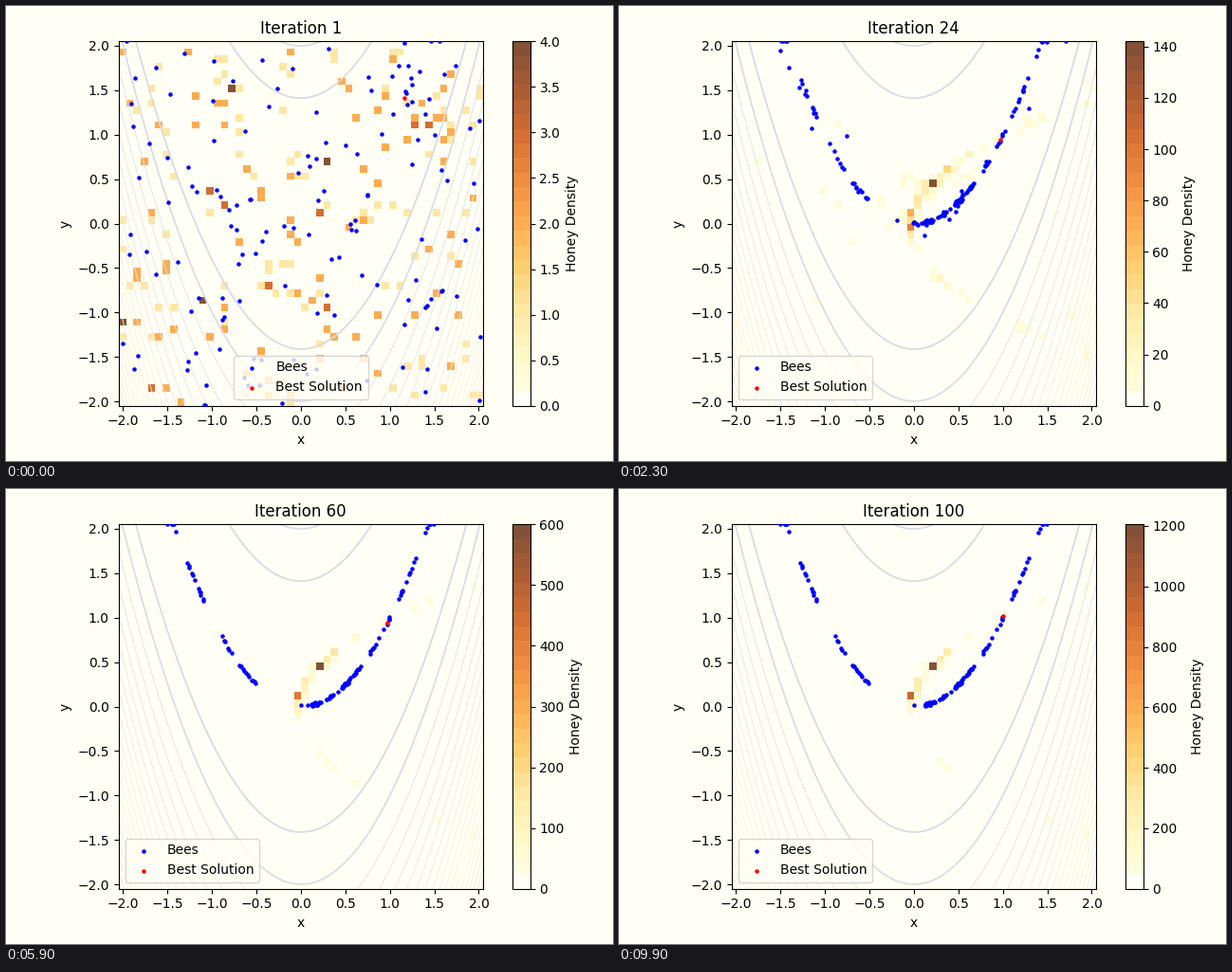
A matplotlib script for the animation above (10000 ms loop, 640 by 480 pixels).

```python
import numpy as np
import matplotlib.pyplot as plt
from matplotlib.animation import FuncAnimation
from matplotlib.colors import LinearSegmentedColormap, ListedColormap

LIM, CELLS, STEPS, SHADES = 2.048, 50, 100, 25
IVORY = "#fffff5"
plt.rcParams.update({"figure.facecolor": IVORY, "axes.facecolor": IVORY})
rng = np.random.default_rng(12)


def rosenbrock(x, y):
    return (1 - x) ** 2 + 100 * (y - x * x) ** 2


def valley_goals():
    """Sorted x positions along y = x^2 where the bees settle."""
    left = rng.normal([-1.43, -1.23, -1.12, -.84, -.67, -.54], .035, (6, 6))
    right = rng.normal([.80, .95, 1.14, 1.20, 1.43], .04, (6, 5))
    dense = .13 + .57 * rng.random(65) ** 1.4
    knot = rng.normal(.5, .02, 10)
    return np.sort(np.concatenate([left.ravel(), right.ravel(), dense, knot, [0]]))


goal = valley_goals()
N = len(goal)


def first_step():
    """Change one coordinate of each bee and keep it if that is better."""
    home = rng.uniform(-LIM, LIM, (N, 2))
    home[:6] = home[6:12] + rng.normal(0, .01, (6, 2))
    trial = home.copy()
    row, col = np.arange(N), rng.integers(0, 2, N)
    mate = home[rng.permutation(N), col]
    trial[row, col] += rng.uniform(-1, 1, N) * (home[row, col] - mate)
    trial = np.clip(trial, -LIM, LIM)
    better = rosenbrock(*trial.T) < rosenbrock(*home.T)
    start = np.where(better[:, None], trial, home)
    return home, start[np.argsort(start[:, 0])]


def shrink(value, chance, most):
    """Some of the offsets jump closer to zero."""
    hit = rng.random(N) < chance
    return np.where(hit, value * rng.uniform(0, most, N), value)


def deposit(pos, weight=1):
    """Honey left on the grid, indexed [x, y] and shown as [row, column]."""
    unit = (np.clip(pos, -LIM, LIM) + LIM) / (2 * LIM)
    cell = (unit * (CELLS - 1)).astype(int)
    grid = np.zeros((CELLS, CELLS))
    np.add.at(grid, tuple(cell.T), weight)
    return grid


def simulate():
    home, start = first_step()
    x0, y0 = start.T
    honey = np.minimum(deposit(home) + deposit(start), 4)
    paths, grids = [start], [honey]
    fx, fy, slow = np.ones((3, N))
    lag = np.where((goal > .1) & (goal < .29), -rng.uniform(0, .25, N), 0)
    noise = rng.normal(0, .008, N)
    weight = np.where((goal > .1) & (goal < .75), 1, .4)
    for _ in range(STEPS - 1):
        fx = shrink(fx, .18, .5)
        fy = shrink(fy, .18, .5)
        slow = shrink(slow, .06, .6)
        x = goal + (x0 - goal) * fx + lag * slow * (1 - fx)
        valley = np.minimum(x * x + noise, LIM)
        pos = np.column_stack([x, valley + (y0 - valley) * fy])
        honey = honey + deposit(pos, weight)
        paths.append(pos)
        grids.append(honey)
    return paths, grids


paths, grids = simulate()
peaks = np.round(np.interp(np.arange(1, STEPS + 1),
                           [1, 14, 34, 49, 60, 77, 100],
                           [4, 51, 233, 391, 600, 888, 1205]))


def best_at(step):
    if step < 6:
        return 1.165, 1.41
    if step < 16:
        return .97, .97
    return (.97, .945) if step < 88 else (1.0, 1.015)


# Empty cells stay clear
shades = plt.get_cmap("YlOrBr")(np.linspace(0, 1, SHADES))
shades[:, 3] = .8
shades[0, 3] = 0

fig, ax = plt.subplots(figsize=(6.4, 4.8), dpi=100)
image = ax.imshow(grids[0], cmap=ListedColormap(shades), origin="lower",
                  vmin=0, vmax=peaks[0], extent=[-LIM, LIM, -LIM, LIM],
                  interpolation="nearest")
fig.colorbar(image, ax=ax, label="Honey Density")

axis = np.linspace(-LIM, LIM, 300)
gx, gy = np.meshgrid(axis, axis)
levels = np.arange(200, 3900, 200)
faint = LinearSegmentedColormap.from_list(
    "faint", ["#d9dbe4", "#e8e8e6", "#fdf3d9", "#f6e4d6"])
ax.contour(gx, gy, rosenbrock(gx, gy), levels=levels, cmap=faint,
           linewidths=np.where(levels < 500, 1.3, .6))

bees = ax.scatter(*paths[0].T, s=5, color="blue", label="Bees", zorder=3)
best = ax.scatter(*best_at(1), s=5, color="red", label="Best Solution", zorder=4)
ax.set(xlim=(-LIM, LIM), ylim=(-LIM, LIM), xlabel="x", ylabel="y")
title = ax.set_title("Iteration 1")
legend = ax.legend(loc="lower center")

# The square axes settle on the second pass
for _ in range(2):
    fig.tight_layout()


def update(i):
    step = i + 1
    bees.set_offsets(paths[i])
    best.set_offsets([best_at(step)])
    image.set_data(grids[i] * peaks[i] / grids[i].max())
    image.set_clim(0, peaks[i])
    title.set_text(f"Iteration {step}")
    legend.set_loc("lower center" if step < 7 else "lower left")
    return bees, best, image, title, legend


anim = FuncAnimation(fig, update, frames=STEPS, interval=100, repeat=True,
                     repeat_delay=0, blit=False)
plt.show()
```
